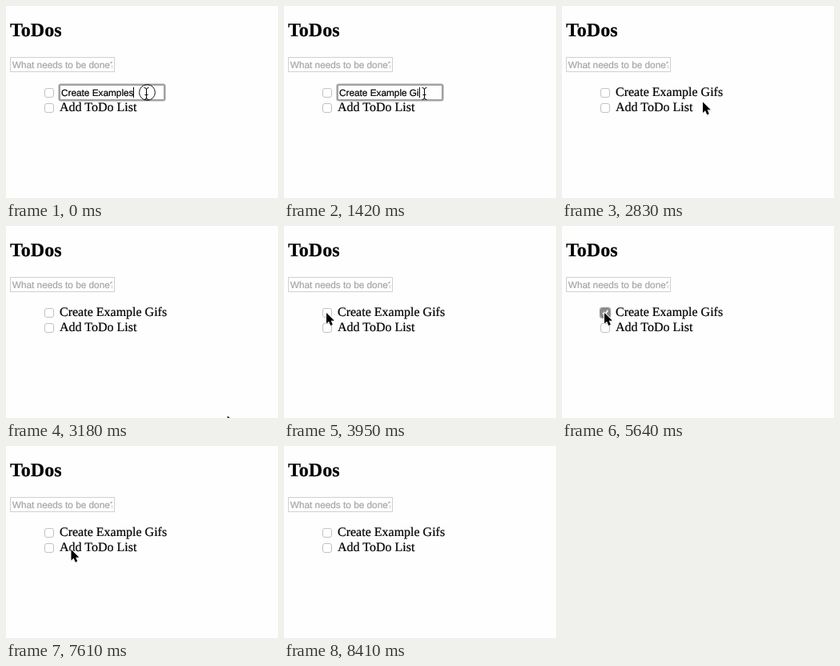
Animation, 340 px wide and 241 px high, one loop 8.76 s. Source, as an HTML page:

```html
<!DOCTYPE html>
<html lang="en">
<head>
<meta charset="utf-8">
<title>ToDos</title>
<style>
html, body { margin: 0; width: 100%; height: 100%; overflow: hidden; background: #fefefe; }
svg { display: block; }
text { text-rendering: geometricPrecision; font-kerning: none; white-space: pre; stroke: #000; stroke-width: .22; }
.serif { font: 16px "Liberation Serif", serif; }
.title { font: bold 24px "Liberation Serif", serif; }
.field { font: 11.8px "Liberation Sans", sans-serif; }
.hint { fill: #a6a6a6; stroke: #a6a6a6; }
.box { fill: #fff; stroke: #c2c2c2; }
</style>
</head>
<body>
<svg width="340" height="241" viewBox="0 0 340 241">
  <defs>
    <clipPath id="inner"><rect x="7" y="65" width="126" height="17"/></clipPath>
    <filter id="soft" x="-30%" y="-30%" width="160%" height="160%"><feGaussianBlur stdDeviation=".6"/></filter>
    <path id="pointer" d="M0 0V13.6L3.1 10.8L5.3 15.9L7.8 14.8L5.7 9.8H9.8Z"/>
  </defs>

  <text class="title" x="5" y="38">ToDos</text>
  <rect x="5.5" y="64.5" width="130" height="18" fill="#fff" stroke="#d0d0d0"/>
  <text class="field hint" x="7.8" y="78" clip-path="url(#inner)">What needs to be done?</text>

  <g id="list">
    <rect id="halo" x="46.8" y="101.8" width="14.4" height="14.4" rx="4" fill="#a6a6a6" filter="url(#soft)"/>
    <rect class="box" x="48.5" y="103.5" width="11" height="11" rx="2.5"/>
    <g id="checked">
      <rect x="48.5" y="103.5" width="11" height="11" rx="2.5" fill="#8d8d8d" stroke="#808080"/>
      <path d="M51 109L53.3 112L57.3 105.8" fill="none" stroke="#fff" stroke-width="1.6"/>
    </g>
    <rect class="box" x="48.5" y="122.5" width="11" height="11" rx="2.5"/>
    <text id="label" class="serif" x="67" y="113">Create Example Gifs</text>
    <text class="serif" x="67" y="132">Add ToDo List</text>
  </g>

  <g id="editor">
    <rect x="66.7" y="98.7" width="131.6" height="19.6" rx="2" fill="#fff" stroke="#a2a2a2" stroke-width="2.6" filter="url(#soft)"/>
    <rect x="68" y="100" width="129" height="17" fill="#fff"/>
    <text id="draft" class="field" x="69" y="113"></text>
    <rect id="caret" y="102" width="1" height="13"/>
  </g>

  <path id="beam" d="M172.5 102.5Q175.5 102.5 175.5 105V115Q175.5 117.5 172.5 117.5M178.5 102.5Q175.5 102.5 175.5 105M175.5 115Q175.5 117.5 178.5 117.5M173.5 111.5H177.5" fill="none" stroke="#000"/>
  <g id="arrow">
    <use href="#pointer" y="1.2" opacity=".35" filter="url(#soft)"/>
    <use href="#pointer" stroke="#fff" stroke-width="1.6" paint-order="stroke"/>
  </g>
  <circle id="ring" r="9.9" fill="none" stroke="#111"/>
</svg>
<script>
const LOOP = 8760;
const BLINK = 530;
const $ = id => document.getElementById(id);

// Keystrokes: focus, one backspace, then a letter of the ending each.
const KEYS = [-360, 430, 700, 1150, 1420, 1680, 1860];
const ENDING = " Gifs";
const DRAFT_X = 69;

// Pointer glides along quadratic curves: through `via` to `to`.
const HOME = [175, 109.5];
const MOVES = [
  { start: 2830, end: 3350, steps: 7, via: [180, 210], to: [331, 260] },
  { start: 3710, end: 3880, steps: 3, via: [192, 184], to: [53, 109] },
  { start: 7610, end: 7870, steps: 4, via: [144, 176], to: [235.5, 242.5] }
];
const CLICKS = [[0, 80], [3880, 3950], [5200, 5380], [8320, 8410]];

const within = (t, [from, to]) => t >= from && t < to;
const smooth = p => p * p * (3 - 2 * p);
const show = (id, on) => $(id).setAttribute("visibility", on ? "inherit" : "hidden");
const place = (id, x, y) => $(id).setAttribute("transform", `translate(${x} ${y})`);

function pointerAt(t) {
  let from = HOME;
  for (const { start, end, steps, via, to } of MOVES) {
    if (t < start) break;
    const step = 1 + Math.floor((t - start) / (end - start) * (steps - 1) + 1e-6);
    const p = smooth(Math.min(1, step / steps)), q = 1 - p;
    from = from.map((a, i) => q * q * a + 2 * p * q * via[i] + p * p * to[i]);
  }
  return from;
}

function renderEditor(t) {
  const pressed = KEYS.filter(key => key <= t);
  const typed = pressed.length - 2;
  $("draft").textContent = "Create Example" + (typed < 0 ? "s" : ENDING.slice(0, typed));
  $("caret").setAttribute("x", Math.round(DRAFT_X + $("draft").getComputedTextLength()));
  show("caret", Math.floor((t - pressed.at(-1)) / BLINK) % 2 === 0);
}

function render(t) {
  const editing = t < 2570;
  show("editor", editing);
  show("label", !editing);
  if (editing) renderEditor(t);
  else show("caret", false);

  const done = within(t, [5640, 6270]);
  show("halo", done);
  show("checked", done);
  show("list", !within(t, [6270, 6360]));

  const [x, y] = pointerAt(t);
  place("arrow", x, y);
  place("ring", x + 1.5, y - 1);
  show("beam", t < 2660);
  show("arrow", t >= 2660 && y < 241);
  show("ring", CLICKS.some(click => within(t, click)));
}

const start = performance.now();
function tick() {
  render((performance.now() - start) % LOOP);
  requestAnimationFrame(tick);
}
tick();
</script>
</body>
</html>
```
